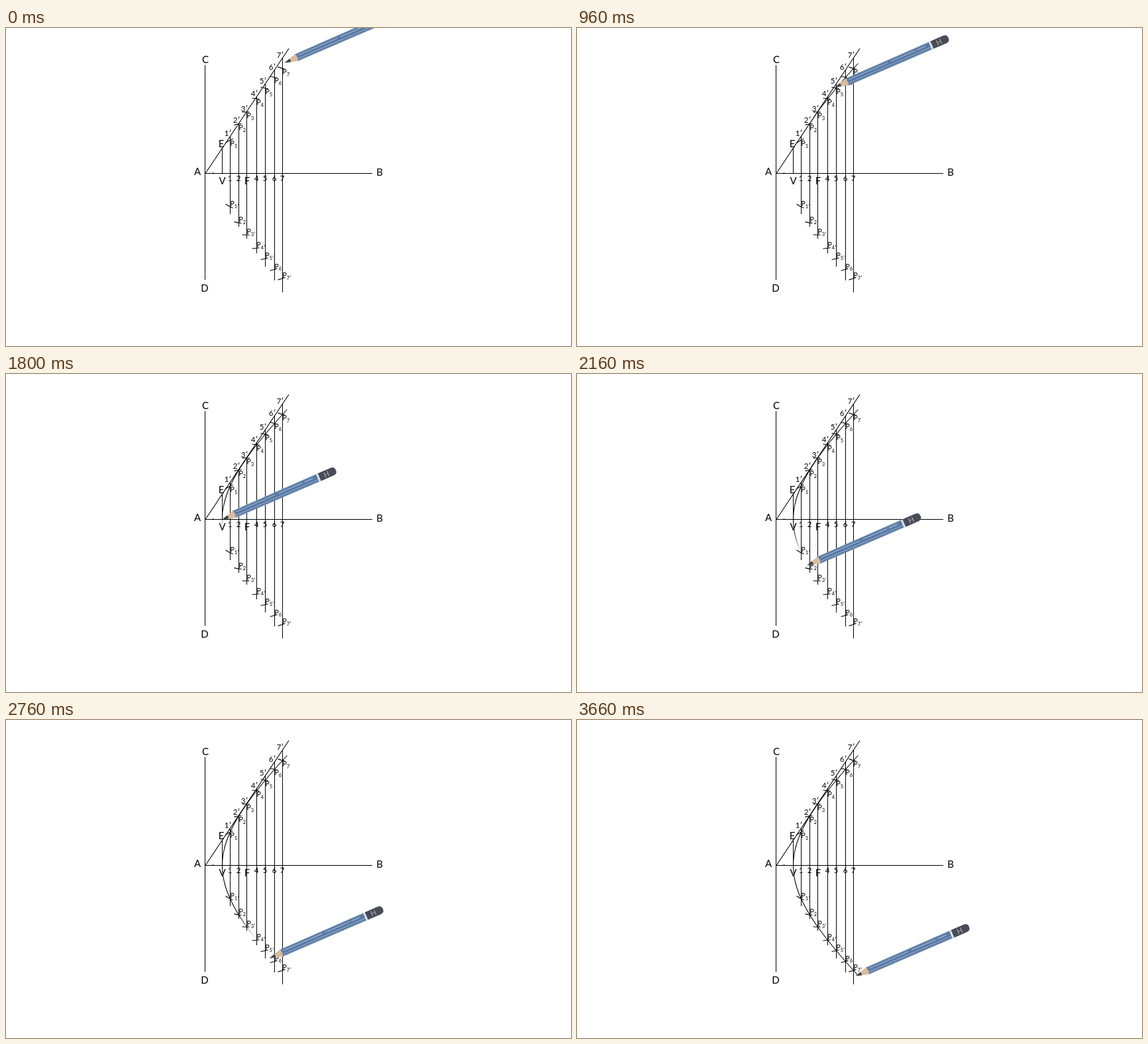
An HTML page that plays this animation: 853 by 480 pixels, repeating every 3.72 s.

```html
<!DOCTYPE html>
<html lang="en">
<head>
<meta charset="utf-8">
<title>Drawing a hyperbola through plotted points</title>
<style>
  html, body { margin: 0; width: 100%; height: 100%; overflow: hidden; background: #fff; }
  svg { display: block; width: 100%; height: 100%; }
  text { font-family: Lato, "Open Sans", sans-serif; fill: #000; }
  .big { font-size: 15px; text-anchor: middle; }
  .num { font-size: 11.5px; text-anchor: middle; }
  .p { font-size: 10.5px; }
  .sub { font-size: 7.5px; }
  .ink { fill: none; stroke: #000; stroke-width: 1.1; }
  .crisp { stroke-width: 1; shape-rendering: crispEdges; }
</style>
</head>
<body>
<svg viewBox="0 0 853 480">
  <defs>
    <linearGradient id="wipe" gradientUnits="userSpaceOnUse" x1="0" x2="0" y1="0" y2="36">
      <stop offset="0" stop-color="#000"/>
      <stop offset="1" stop-color="#000" stop-opacity="0"/>
    </linearGradient>
  </defs>
  <g id="figure"></g>
  <path id="curve" fill="none" stroke="url(#wipe)" stroke-width="1.1"/>
  <g id="pencil">
    <path d="M19 -5.5L160 -6V6L19 5.5Z" fill="#587aa6"/>
    <path d="M19 -5.2L160 -5.6M19 5.2L160 5.6" stroke="#8199b8" stroke-width="1"/>
    <path d="M24 -2.2H150" stroke="#b4c3d6" stroke-dasharray="64 5 40 3"/>
    <path d="M22 2.4H157" stroke="#9aafc9"/>
    <path d="M8 -2.3L19 -5.5Q23 -3.5 20 -1.5Q24 0 20 2Q23 3.5 19 5.5L8 2.3Z" fill="#d9bc9d"/>
    <path d="M0 0L9 -2.7Q11 0 9 2.7Z" fill="#41444d"/>
    <path d="M157 -6H160V6H157Z" fill="#dfe3e8"/>
    <path d="M160 -6.2H181Q187 -6 187 0T181 6.2H160Z" fill="#484c58"/>
    <text x="171.5" y="4" font-size="11" text-anchor="middle" style="fill:#b4b6b3">H</text>
  </g>
</svg>
<script>
const LOOP = 3720, STEP = 60, TRAVEL = 3600;
const AXIS = 219.5, A = 301, V = 326.5, F = 364, SLOPE = 1.496;
const $ = id => document.getElementById(id);

// Hyperbola with its vertex at V: half height at x, and distance from V at a height
const height = x => Math.sqrt((x - V) * (203 + 0.8 * (x - V)));
const reach = h => (Math.sqrt(203 ** 2 + 3.2 * h * h) - 203) / 1.6;
const oblique = x => AXIS - SLOPE * (x - A);

const text = (cls, x, y, s) => `<text class="${cls}" x="${x}" y="${y}">${s}</text>`;
const line = (x1, y1, x2, y2, cls = 'ink crisp') =>
  `<path class="${cls}" d="M${x1} ${y1}L${x2} ${y2}"/>`;
const dot = x => line(x - 1, 218.5, x, 218.5);
const label = (x, y, sub) => text('p', x, y, 'P') + text('sub', x + 6.3, y + 2.8, sub);

// Compass mark centred on F, crossing the ordinate at x; side is -1 above, 1 below
function mark(x, side) {
  const r = Math.hypot(x - F, height(x));
  const at = px => `${px} ${AXIS + side * Math.sqrt(r * r - (px - F) ** 2)}`;
  return `<path class="ink" d="M${at(x - 7)}A${r} ${r} 0 0 ${side < 0 ? 1 : 0} ${at(x + 4)}"/>`;
}

let art = line(300.5, 56, 300.5, 380) + line(300, AXIS, 553, AXIS) +
  line(A, AXIS, 427, oblique(427), 'ink') + line(V, oblique(V), V, AXIS) + dot(313);

[['A', 289, 222], ['B', 564, 223], ['C', 301, 53], ['D', 300, 398],
 ['E', 325, 180], ['V', V, 236], ['F', F, 236]]
  .forEach(([s, x, y]) => art += text('big', x, y, s));

[338.5, 351.5, 363.5, 378.5, 391.5, 405.5, 417.5].forEach((x, i) => {
  const n = i + 1, top = oblique(x), h = height(x);
  art += line(x, top, x, 2 * AXIS - top + 5) + dot(x);
  art += text('num', x - 3.5, top - 0.5, n + '′');
  if (n !== 3) art += text('num', x - 0.5, 231, n); // F stands here
  art += label(x, AXIS - h + 9, n) + label(x, AXIS + h - 1, n + '′');
  art += mark(x, -1) + mark(x, 1);
});
$('figure').innerHTML = art;

const points = [];
for (let h = -166; h <= 166; h += 4) points.push(`${V + reach(h)} ${AXIS + h}`);
$('curve').setAttribute('d', 'M' + points.join('L'));

// Slow at both ends, fastest at the vertex
function swing(t) {
  const s = Math.min(t / TRAVEL, 1) * 2 - 1;
  return Math.sign(s) * (1 - (1 - Math.abs(s)) ** 2.4);
}

function draw(now) {
  const t = Math.floor(now % LOOP / STEP) * STEP;
  const h = 167 * swing(t);
  $('pencil').setAttribute('transform',
    `translate(${V + 0.95 * reach(h)} ${AXIS + h}) rotate(-23.5)`);
  $('wipe').setAttribute('gradientTransform', `translate(0 ${18 + t * 0.1})`);
}

const start = performance.now();
(function tick() {
  draw(performance.now() - start);
  requestAnimationFrame(tick);
})();
</script>
</body>
</html>
```
